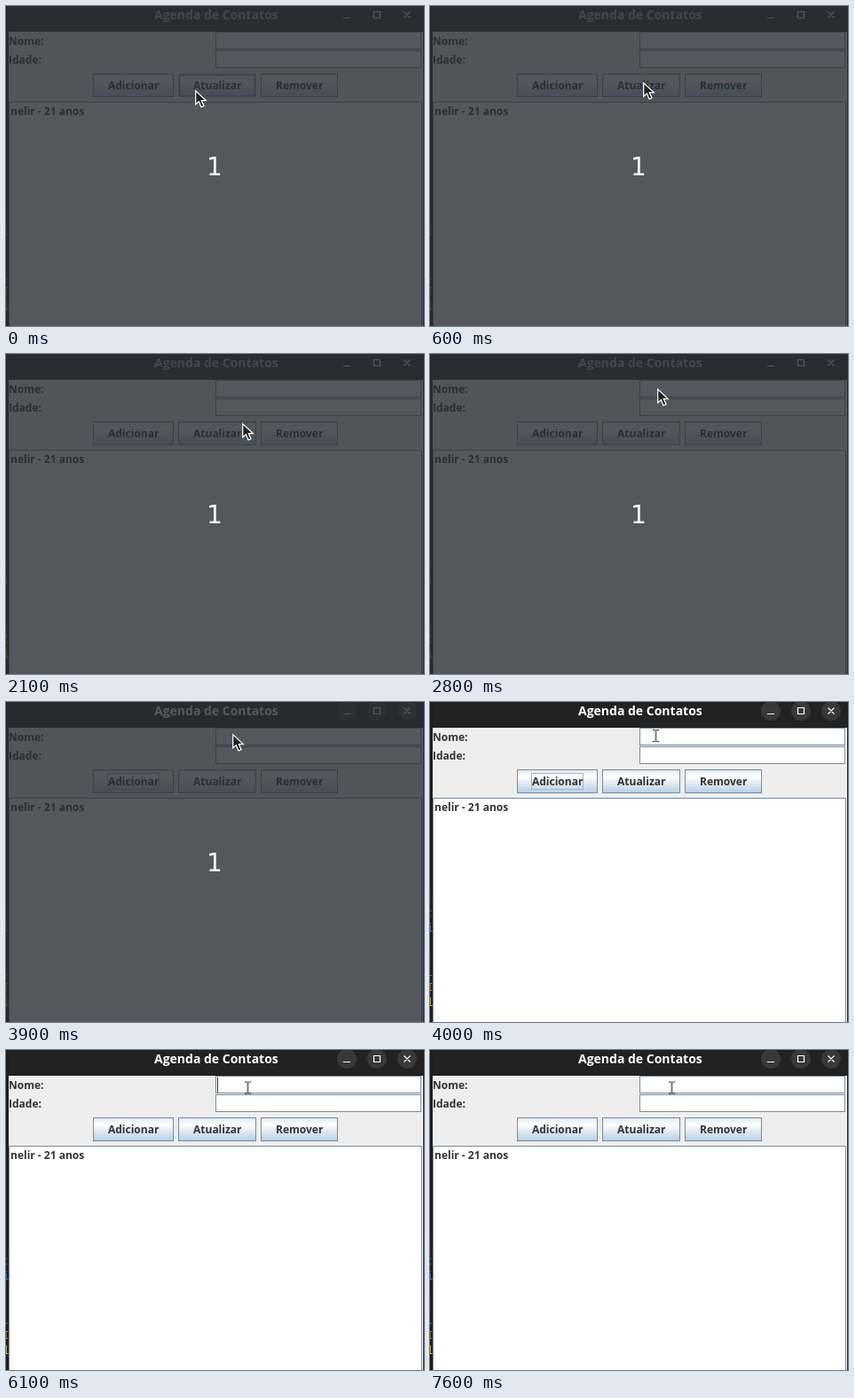
An HTML page for the animation above (8000 ms loop, 471 px wide and 361 px high).

```html
<!DOCTYPE html>
<html lang="pt">
<head>
<meta charset="utf-8">
<title>Agenda de Contatos</title>
<style>
  html, body { margin: 0; width: 100%; height: 100%; overflow: hidden; background: #1e1e1e; }
  svg { display: block; width: 471px; height: 361px; }
  text { font: 700 12px "Open Sans", "Noto Sans", sans-serif; fill: #333; }
  .title { font-size: 14px; fill: #fff; }
  .count { font: 28px "DejaVu Sans", sans-serif; fill: #fff; text-anchor: middle; }
  .code text { font: 13px "Noto Sans Mono", monospace; }
  .line { fill: none; stroke: #7a8a99; }
  .light { fill: none; stroke: #b8cfe5; }

  .idle, .active, .hover, .focus, .caret, .overlay, .arrow, .beam {
    animation: 8s step-end infinite;
  }
  .idle { animation-name: idle; }
  .active { animation-name: active; }
  .hover { animation-name: hover; }
  .focus { animation-name: focus; }
  .caret { animation-name: caret; }
  .overlay { animation-name: overlay; }
  .arrow { animation-name: overlay, arrow; }
  .beam { animation-name: active-beam, beam; }

  @keyframes idle { 0% { opacity: 1 } 40%, 100% { opacity: 0 } }
  @keyframes active { 0% { opacity: 0 } 40%, 100% { opacity: 1 } }
  @keyframes hover { 0% { opacity: 1 } 2.5%, 100% { opacity: 0 } }
  @keyframes focus { 0% { opacity: 0 } 41.25% { opacity: 1 } 75%, 100% { opacity: 0 } }
  @keyframes overlay { 0% { opacity: 1 } 50%, 100% { opacity: 0 } }
  @keyframes active-beam { 0% { opacity: 0 } 50%, 100% { opacity: 1 } }
  @keyframes caret {
    0% { opacity: 0 }
    76.25% { opacity: 1 }
    83.75% { opacity: 0 }
    91.25% { opacity: 1 }
    95%, 100% { opacity: 0 }
  }
  @keyframes arrow {
    0% { transform: translate(213px, 95px) }
    6.25% { transform: translate(218px, 93px) }
    7.5% { transform: translate(240px, 86px) }
    8.75% { transform: translate(266px, 78px) }
    10% { transform: translate(286px, 74px) }
    11.25% { transform: translate(292px, 73px) }
    16.25% { transform: translate(291px, 73px) }
    17.5% { transform: translate(290px, 73px) }
    21.25% { transform: translate(287px, 74px) }
    22.5% { transform: translate(280px, 76px) }
    23.75% { transform: translate(273px, 78px) }
    25% { transform: translate(268px, 78px) }
    26.25% { transform: translate(266px, 78px) }
    28.75% { transform: translate(265px, 80px) }
    30% { transform: translate(266px, 83px) }
    31.25% { transform: translate(264px, 76px) }
    32.5% { transform: translate(260px, 62px) }
    33.75% { transform: translate(257px, 48px) }
    35% { transform: translate(256px, 39px) }
    36.25% { transform: translate(256px, 35px) }
    45%, 100% { transform: translate(255px, 36px) }
  }
  @keyframes beam {
    0% { transform: translate(254.5px, 38px) }
    67.5% { transform: translate(255.5px, 38.5px) }
    68.75% { transform: translate(272px, 48px) }
    73.75% { transform: translate(273px, 46px) }
    75% { transform: translate(272.5px, 44px) }
    76.25%, 100% { transform: translate(272.5px, 42.5px) }
  }
</style>
</head>
<body>
<svg viewBox="0 0 471 361">
  <defs>
    <linearGradient id="metal" x2="0" y2="1">
      <stop offset="0" stop-color="#dde8f3"/>
      <stop offset=".3" stop-color="#fff"/>
      <stop offset=".6" stop-color="#dde8f3"/>
      <stop offset="1" stop-color="#b8cfe5"/>
    </linearGradient>
    <g id="field">
      <rect width="233" height="20" fill="#fff"/>
      <rect class="line" x=".5" y=".5" width="231" height="19"/>
    </g>
  </defs>

  <rect width="471" height="361" fill="#1e1e1e"/>
  <g class="code">
    <text x="-5" y="223" style="fill:#4fa34a">(</text>
    <text x="-5" y="242" style="fill:#8a6a58">c</text>
    <text x="-4" y="259" style="fill:#5b78d6">i</text>
    <text x="-5" y="291" style="fill:#8a6a58">(</text>
    <text x="-5" y="309" style="fill:#6fa548">1</text>
    <text x="-4" y="326" style="fill:#c98a35">I</text>
    <text x="-4" y="343" style="fill:#d2c53c">l</text>
  </g>

  <!-- Title bar -->
  <rect x="3" width="467" height="28" fill="#222"/>
  <rect class="idle" x="3" width="467" height="28" fill="#2c2c2c"/>
  <text class="title idle" x="167" y="15" style="fill:#aaa">Agenda de Contatos</text>
  <g class="active">
    <text class="title" x="167" y="15">Agenda de Contatos</text>
    <g fill="#383838">
      <circle cx="384" cy="10" r="11"/>
      <circle cx="418" cy="10" r="11"/>
      <circle cx="452" cy="10" r="11"/>
    </g>
  </g>
  <path d="M380 13.5h8M414.5 6.5h7v7h-7zM448.5 6.5l7 7m0-7l-7 7" fill="none" stroke="#fff" stroke-width="1.2"/>

  <!-- Form -->
  <rect x="3" y="28" width="467" height="333" fill="#eee"/>
  <path d="M3 28.5h467" stroke="#1a1a1a"/>
  <text x="3" y="44">Nome:</text>
  <text x="3" y="65">Idade:</text>
  <use href="#field" x="236" y="29"/>
  <use href="#field" x="236" y="50"/>
  <path class="caret" d="M238.5 31v17" stroke="#333"/>

  <g fill="url(#metal)" stroke="#7a8a99">
    <rect x="98.5" y="76.5" width="90" height="26"/>
    <rect x="194.5" y="76.5" width="87" height="26"/>
    <rect x="287.5" y="76.5" width="86" height="26"/>
  </g>
  <g class="hover">
    <rect class="light" x="194.5" y="76.5" width="87" height="26"/>
    <rect class="line" x="195.5" y="77.5" width="85" height="24"/>
    <rect class="light" x="196.5" y="78.5" width="83" height="22"/>
  </g>
  <rect class="focus" x="114.5" y="80.5" width="58" height="18" fill="none" stroke="#a3b8cc"/>
  <text x="115" y="94">Adicionar</text>
  <text x="211" y="94">Atualizar</text>
  <text x="304" y="94">Remover</text>

  <!-- Contact list -->
  <rect x="3" y="108" width="467" height="253" fill="#fff"/>
  <path class="line" d="M3.5 361V108.5H468.5V361"/>
  <text x="5" y="123">nelir - 21 anos</text>

  <!-- Countdown -->
  <g class="overlay">
    <rect width="471" height="361" fill="#2a2e35" fill-opacity=".8"/>
    <text class="count" x="235" y="191">1</text>
  </g>

  <!-- Pointers -->
  <path class="arrow" d="M.7 .9V16L4.3 12.7 7 19 10 17.7 7.3 11.6H12.3Z" fill="#222" stroke="#fff" stroke-width="1.2"/>
  <path class="beam" d="M-3.5-6.5h3M.5-6.5h3M-3.5 6.5h3M.5 6.5h3M0-6V6" fill="none" stroke="#222" stroke-width="1.2"/>
</svg>
</body>
</html>
```
